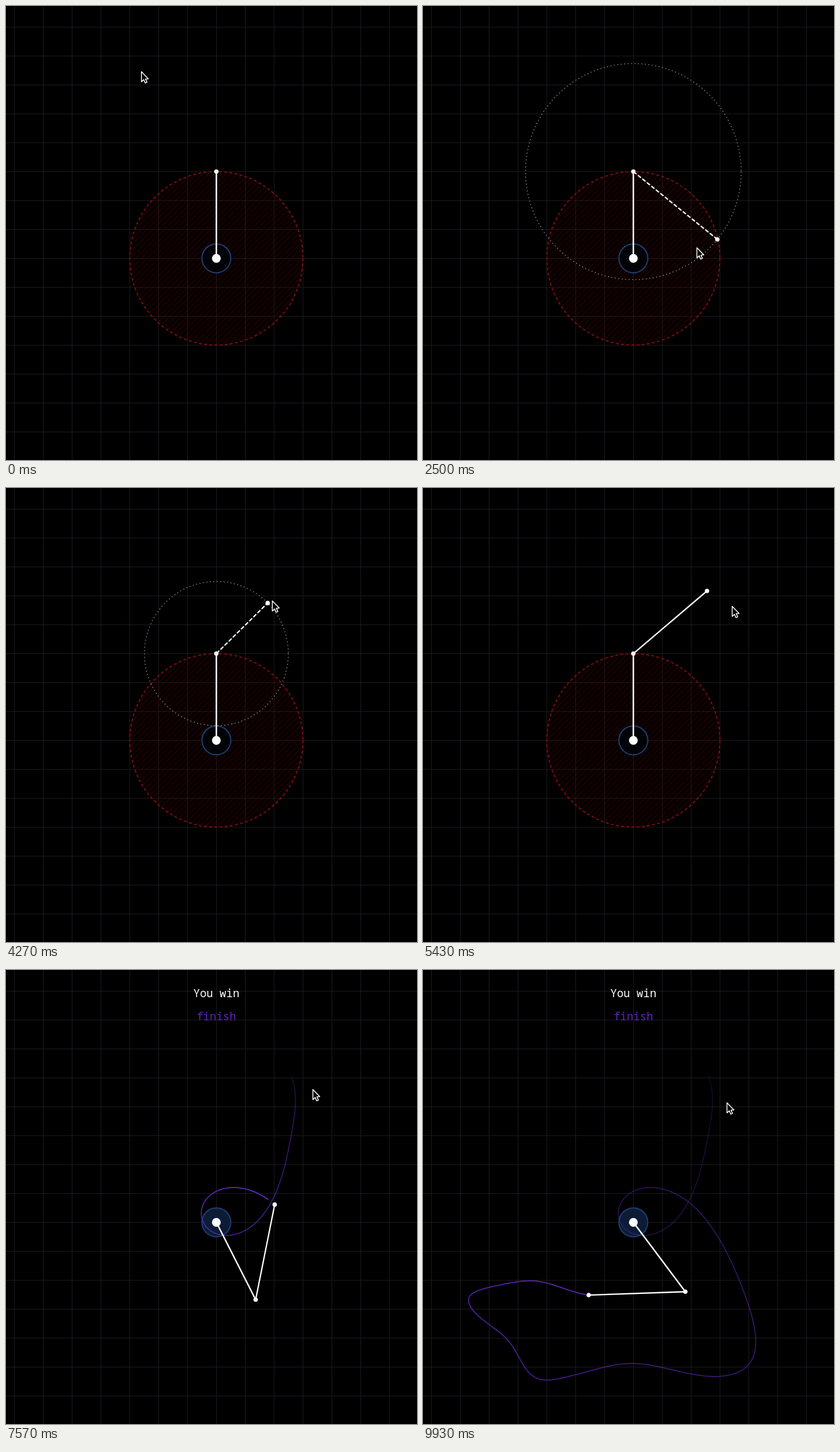
An HTML page with a canvas for the animation above (10000 ms loop, 712 by 785 pixels).

```html
<!DOCTYPE html>
<html lang="en">
<head>
<meta charset="utf-8">
<title>Double pendulum</title>
<style>
html, body { margin: 0; width: 100%; height: 100%; overflow: hidden; background: #000; }
canvas { display: block; }
</style>
</head>
<body>
<canvas id="stage" width="712" height="785"></canvas>
<script>
const ctx = document.getElementById('stage').getContext('2d');
const W = 712, H = 785, LOOP = 10000, TAU = Math.PI * 2;
const PIVOT = [364.4, 436.3], ELBOW = [364.4, 286.3];
const L1 = 150, L2 = 167.6, GOAL = 25;
const DRAG = 1400, DROP = 5070, RELEASE = 5800, WIN = 7030, END = 9930;
const TIP_LAG = 30, TRAIL_LAG = 13, TRAIL_STEP = 10;

// Tangents that keep the curvature continuous: rest at the start, free at the end, still in holds.
function smoothTangents(times, values) {
  const last = values.length - 1;
  const gap = i => times[i + 1] - times[i];
  const slope = i => (values[i + 1] - values[i]) / gap(i);
  const m = values.map(() => 0);
  for (let pass = 0; pass < 80; pass++) {
    for (let i = 1; i < last; i++) {
      const a = slope(i - 1), b = slope(i), h0 = gap(i - 1), h1 = gap(i);
      if (a * b !== 0) {
        m[i] = (3 * (a * h1 + b * h0) - h1 * m[i - 1] - h0 * m[i + 1]) / (2 * (h0 + h1));
      }
    }
    m[last] = (3 * slope(last - 1) - m[last - 1]) / 2;
  }
  return m;
}

// Smooth path through a few [time, a, b] key points.
function path(keys) {
  const times = keys.map(k => k[0]);
  const channels = [1, 2].map(c => {
    const values = keys.map(k => k[c]);
    return { values, tangents: smoothTangents(times, values) };
  });
  const last = times.length - 1;
  return time => {
    const t = Math.max(times[0], Math.min(times[last], time));
    let i = 0;
    while (i < last - 1 && t > times[i + 1]) i++;
    const h = times[i + 1] - times[i], s = (t - times[i]) / h, r = 1 - s;
    return channels.map(({ values: v, tangents: m }) =>
      v[i] + (v[i + 1] - v[i]) * s * s * (3 - 2 * s) + h * s * r * (r * m[i] - s * m[i + 1]));
  };
}

const mouse = path([
  [130, 234, 113], [770, 364, 286], [1400, 364, 286], [1950, 500, 145],
  [2250, 558, 300], [2470, 511, 403], [2500, 475, 417], [2950, 620, 440],
  [3340, 439, 306], [3370, 419, 308], [4500, 492, 178], [5070, 492, 178],
  [5430, 535, 204], [5800, 535, 204], [7570, 531, 206], [8300, 526, 229]
]);

// Angles of both links in degrees from straight down.
const swing = path([
  [RELEASE, 180, 130.2], [6470, 189.9, 105], [6830, 191.5, 48.6], [7110, 145, -35],
  [7318, 93, -102.4], [7570, 27.2, -191], [7770, 9.9, -260.1], [7935, 37.2, -322.3],
  [8060, 50.7, -366.9], [8420, 2.3, -405.7], [8601, -32.9, -392.9], [8830, -69.5, -389],
  [9031, -63, -423], [9313, -27, -458.5], [9628, 4.2, -465.5], [END, 36.9, -448]
]);

function reach([x, y], length, degrees) {
  const a = degrees * Math.PI / 180;
  return [x + length * Math.sin(a), y + length * Math.cos(a)];
}

function pose(t) {
  const [a, b] = swing(t);
  const elbow = reach(PIVOT, L1, a);
  return { elbow, tip: reach(elbow, L2, b) };
}

const trail = [];
for (let t = RELEASE; t <= END; t += TRAIL_STEP) trail.push(pose(t).tip);

function circle([x, y], r) {
  ctx.beginPath();
  ctx.arc(x, y, r, 0, TAU);
}

function stroke(color, width, dash = []) {
  ctx.strokeStyle = color;
  ctx.lineWidth = width;
  ctx.setLineDash(dash);
  ctx.stroke();
  ctx.setLineDash([]);
}

function line(a, b, color, width, dash) {
  ctx.beginPath();
  ctx.moveTo(...a);
  ctx.lineTo(...b);
  stroke(color, width, dash);
}

function dot(p, r) {
  circle(p, r);
  ctx.fillStyle = '#fff';
  ctx.fill();
}

function drawGrid() {
  ctx.fillStyle = '#1c1c22';
  for (let x = 14; x < W; x += 50) ctx.fillRect(x, 0, 1, H);
  for (let y = 36; y < H; y += 50) ctx.fillRect(0, y, W, 1);
}

function drawZone() {
  const [x, y] = PIVOT;
  ctx.save();
  circle(PIVOT, L1);
  ctx.clip();
  ctx.fillStyle = 'rgba(60, 0, 0, 0.13)';
  ctx.fillRect(x - L1, y - L1, 2 * L1, 2 * L1);
  ctx.beginPath();
  for (let k = -2 * L1; k <= 2 * L1; k += 10) {
    ctx.moveTo(x + k - L1, y + L1);
    ctx.lineTo(x + k + L1, y - L1);
  }
  stroke('rgba(120, 8, 8, 0.5)', 1);
  ctx.restore();
  circle(PIVOT, L1);
  stroke('#7c0f10', 2, [5, 4]);
}

function drawGoal(won) {
  circle(PIVOT, GOAL);
  ctx.fillStyle = won ? '#0c1c36' : '#020306';
  ctx.fill();
  stroke('#1e3a6b', 2.2);
}

function drawTrail(t) {
  const count = Math.min(trail.length - 1, Math.floor((t - TRAIL_LAG - RELEASE) / TRAIL_STEP));
  for (let i = 1; i <= count; i++) {
    const alpha = 0.08 + 0.92 * i / count;
    line(trail[i - 1], trail[i], `rgba(104, 45, 204, ${alpha})`, 1.7);
  }
}

function drawMessage() {
  ctx.font = '500 19px "Noto Sans Mono", "DejaVu Sans Mono", monospace';
  ctx.textAlign = 'center';
  ctx.fillStyle = '#fff';
  ctx.fillText('You win', PIVOT[0], 47);
  ctx.fillStyle = '#5f27b8';
  ctx.fillText('finish', PIVOT[0], 87);
}

function drawCursor([x, y]) {
  const outline = [[0, 0], [0, 17.5], [4, 13.8], [6.6, 19.6], [9.6, 18.3], [7, 12.6], [12, 12.3]];
  ctx.beginPath();
  outline.forEach(([dx, dy]) => ctx.lineTo(x + 0.6 + dx, y + 0.6 + dy));
  ctx.closePath();
  ctx.fillStyle = '#000';
  ctx.fill();
  ctx.lineJoin = 'round';
  stroke('#fff', 1.5);
}

function draw(t) {
  const released = t >= RELEASE, won = t >= WIN;
  const dragging = t >= DRAG && t < DROP;
  const { elbow, tip } = released ? pose(t)
    : { elbow: ELBOW, tip: mouse(Math.min(t - TIP_LAG, DROP)) };

  ctx.fillStyle = '#000';
  ctx.fillRect(0, 0, W, H);
  drawGrid();
  if (!released) drawZone();
  drawGoal(won);
  if (released) drawTrail(t);

  if (dragging) {
    circle(elbow, Math.hypot(tip[0] - elbow[0], tip[1] - elbow[1]));
    stroke('#8c8c8c', 1.6, [1.5, 4.5]);
  }
  line(PIVOT, elbow, '#fff', 2.5);
  if (t >= DRAG) {
    line(elbow, tip, '#fff', 2.3, dragging ? [7, 3] : []);
    dot(tip, 3.8);
  }
  dot(elbow, 3.8);
  dot(PIVOT, 7.6);

  if (won) drawMessage();
  drawCursor(mouse(t));
}

function frame() {
  draw(performance.now() % LOOP);
  requestAnimationFrame(frame);
}
frame();
</script>
</body>
</html>
```
